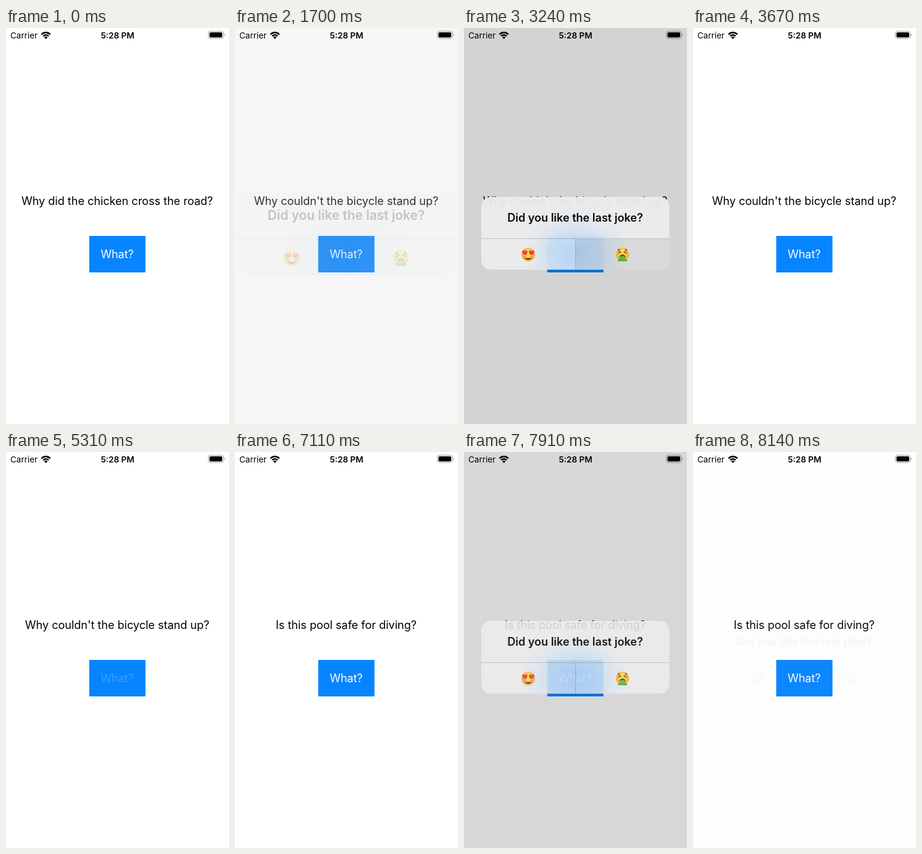
Animation, 361 px wide and 640 px high, one loop 8330 ms. Source, as an HTML page:

```html
<!DOCTYPE html>
<html lang="en">
<head>
<meta charset="utf-8">
<title>Jokes</title>
<style>
  html, body { margin: 0; width: 100%; height: 100%; overflow: hidden; background: #fff; }
  svg { display: block; width: 100vw; height: 100vh; }
  text { font: 18.05px Inter, "Open Sans", sans-serif; }
  .mid { text-anchor: middle; }
  .status { font-size: 13.5px; }
  .bold { font-weight: 600; }
  .button rect { fill: #0685ff; }
  .button text { fill: #fff; }
</style>
</head>
<body>
<svg viewBox="0 0 361 640">
  <defs>
    <radialGradient id="glow">
      <stop offset="0" stop-color="#a9d0fb" stop-opacity=".75"/>
      <stop offset=".5" stop-color="#b7d7fa" stop-opacity=".5"/>
      <stop offset="1" stop-color="#cfe3f8" stop-opacity="0"/>
    </radialGradient>
    <radialGradient id="face" cy=".4">
      <stop offset=".4" stop-color="#ffdc55"/>
      <stop offset="1" stop-color="#f3a92c"/>
    </radialGradient>
    <clipPath id="panel"><rect x="28" y="273" width="304.5" height="117.5" rx="15.5"/></clipPath>
    <path id="heart" d="M0 4.6C-6.5 .5-4.6-4.4-1.8-3.8-.7-3.6 0-2.4 0-2.4S.7-3.6 1.8-3.8C4.6-4.4 6.5.5 0 4.6Z" fill="#ee3e38"/>
  </defs>
  <rect width="361" height="640" fill="#fff"/>

  <g id="page">
    <text id="setup" class="mid" x="180" y="285.6"></text>
    <g class="button">
      <rect x="134.7" y="336" width="91.1" height="59"/>
      <text id="what" class="mid" x="180" y="372">What?</text>
    </g>
  </g>
  <g id="answer">
    <text id="punchline" class="mid" x="180" y="352.6"></text>
    <g class="button">
      <rect x="121" y="403" width="119" height="59"/>
      <text class="mid" x="180" y="439">Next joke</text>
    </g>
  </g>

  <text class="status" x="7" y="16.5">Carrier</text>
  <text class="status bold mid" x="180.5" y="16.5">5:28 PM</text>
  <g fill="none" stroke="#000" stroke-width="2.5">
    <path d="M57.4 10.3A10.2 10.2 0 0 1 71.8 10.3M60.2 13.1A6.2 6.2 0 0 1 69 13.1"/>
    <path d="M64.6 17.9L61.8 15A4 4 0 0 1 67.4 15Z" fill="#000" stroke="none"/>
  </g>
  <rect x="327.6" y="5.2" width="24.2" height="11.8" rx="3.4" fill="none" stroke="#999"/>
  <rect x="329.4" y="7" width="20.6" height="8.2" rx="1.9"/>
  <path d="M353.2 9.2Q355.6 11.1 353.2 13Z" fill="#999"/>

  <rect id="dim" width="361" height="640"/>
  <g id="alert">
    <g clip-path="url(#panel)">
      <rect x="28" y="273" width="305" height="118" fill="#ededed"/>
      <ellipse cx="180" cy="365" rx="92" ry="72" fill="url(#glow)"/>
      <rect id="leftPress" x="28" y="341" width="152" height="50" fill-opacity=".08"/>
      <rect id="rightPress" x="181" y="341" width="152" height="50" fill-opacity=".08"/>
      <path d="M28 340.5H333M180.5 340.5V391" stroke="#000" stroke-opacity=".18"/>
    </g>
    <text class="bold mid" x="180" y="313">Did you like the last joke?</text>
    <g transform="translate(104 366)">
      <circle r="11" fill="url(#face)"/>
      <use href="#heart" x="-5.4" y="-3"/>
      <use href="#heart" x="5.4" y="-3"/>
      <path d="M-6 3Q0 5 6 3Q5 8.6 0 8.6T-6 3Z" fill="#6d3414"/>
      <path d="M-5.2 3.6Q0 5 5.2 3.6L4.6 5Q0 6-4.6 5Z" fill="#fff"/>
    </g>
    <g transform="translate(256.5 365.5)">
      <circle r="10.6" fill="url(#face)"/>
      <path d="M-7-5.4L-2.6-3L-7-1M7-5.4L2.6-3L7-1M-7.5-7.5L-4-7M7.5-7.5L4-7" fill="none" stroke="#76451b" stroke-width="1.3"/>
      <path d="M-5 5Q-4 .6 0 .6T5 5Z" fill="#6d3414"/>
      <path d="M-3.8 3.6Q0 1.6 3.8 3.6L4.4 7.4Q9 9 7.4 11.4H-7.4Q-9 9-4.4 7.4Z" fill="#58ad2c"/>
      <path d="M-1.6 4.5V9M1.8 4.5V8" stroke="#8ed04e" stroke-width="1"/>
    </g>
  </g>
</svg>
<script>
const LOOP = 8330;
const jokes = [
  ["Why did the chicken cross the road?", "To get to the other side!"],
  ["Why couldn't the bicycle stand up?", "Because it was two tired!"],
  ["Is this pool safe for diving?", "It deep ends."],
];
const el = id => document.getElementById(id);
const ease = [0, .2, .4, .6, .8, 1].map(x => x * x * (3 - 2 * x));
const release = [.2, .3, .6, .9, 1, 1];
const appear = [0, .2, .65, .93, 1];

// Each track entry is [start, end, values]; values change in even, hard steps.
const jokeTrack = [[1590, 1590, [1]], [7110, 7110, [2]]];
const revealTrack = [[470, 990, ease], [1590, 1590, [0]], [5310, 5820, ease], [7110, 7110, [0]]];
const labelTrack = [[470, 990, release], [5310, 5820, release]];
const alertTrack = [
  [1590, 2050, appear], [3240, 3670, [.96, .5, .15, .03, 0]],
  [7110, 7560, appear], [7800, 8140, [1, .88, .3, .03]],
];
const scaleSteps = appear.map(p => 1.2 - .2 * p);
const scaleTrack = [[1590, 2050, scaleSteps], [7110, 7560, scaleSteps]];
const leftTrack = [[7800, 7905, [1, 0]]];
const rightTrack = [[3240, 3345, [1, 0]]];

function sample(track, t, initial) {
  const entry = track.filter(([start]) => start <= t).pop();
  if (!entry) return initial;
  const [start, end, values] = entry;
  const last = values.length - 1;
  const gap = (end - start) / last || 1;
  return values[Math.min(last, Math.floor((t - start + 6) / gap))];
}

function setOpacity(id, value) {
  el(id).setAttribute("opacity", value);
}

function draw(t) {
  const [setup, punchline] = jokes[sample(jokeTrack, t, 0)];
  const reveal = sample(revealTrack, t, 0);
  const presence = sample(alertTrack, t, 0);
  const scale = sample(scaleTrack, t, 1);

  el("setup").textContent = setup;
  el("punchline").textContent = punchline;
  el("page").setAttribute("transform", `translate(0 ${-67 * reveal})`);
  setOpacity("answer", reveal);
  setOpacity("what", sample(labelTrack, t, 1));
  setOpacity("dim", .18 * presence);
  setOpacity("alert", presence);
  setOpacity("leftPress", sample(leftTrack, t, 0));
  setOpacity("rightPress", sample(rightTrack, t, 0));
  el("alert").setAttribute("transform",
    `translate(180 331.5) scale(${scale}) translate(-180 -331.5)`);
}

const began = performance.now();
function tick() {
  draw((performance.now() - began) % LOOP);
  requestAnimationFrame(tick);
}
tick();
</script>
</body>
</html>
```
